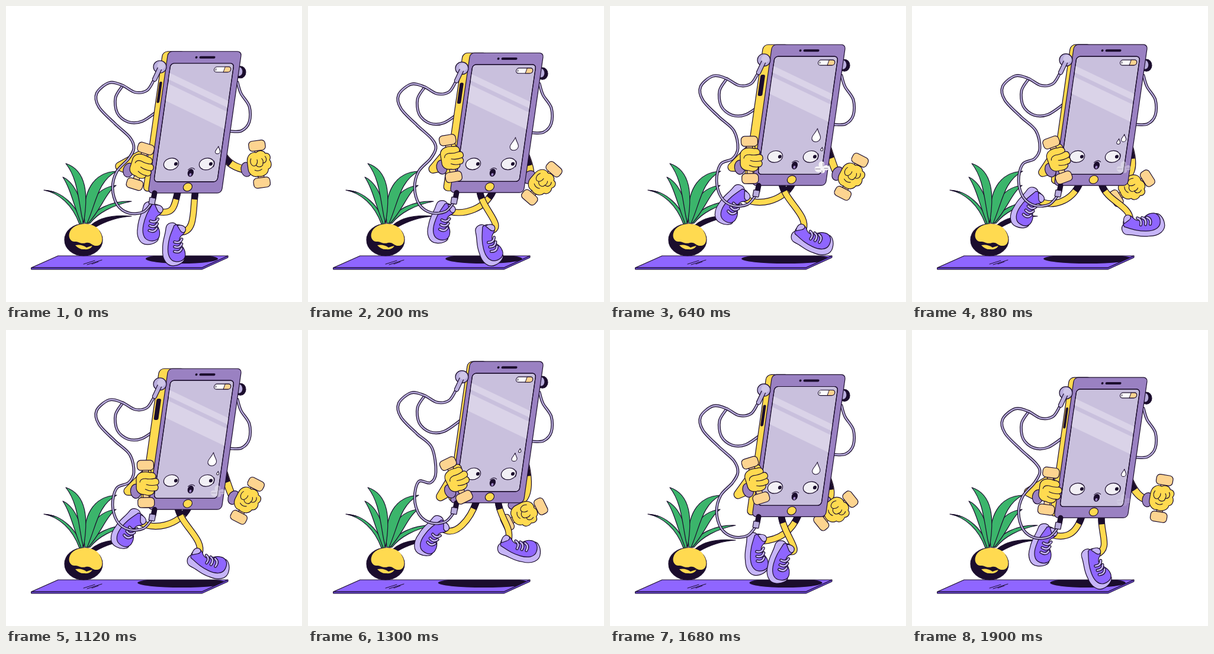
Animation, 500 px wide and 500 px high, one loop 1920 ms. Source, as an HTML page with a canvas:

```html
<!DOCTYPE html>
<html lang="en">
<head>
<meta charset="utf-8">
<title>Running phone</title>
<style>
html, body { margin: 0; width: 100%; height: 100%; overflow: hidden; background: #fff; }
canvas { display: block; width: 100vw; height: 100vh; }
</style>
</head>
<body>
<canvas id="stage" width="500" height="500"></canvas>
<script>
const g = document.getElementById('stage').getContext('2d');
const LOOP = 1920, STRIDE = 480;
const INK = '#1b0d2d', YELLOW = '#ffda50', PEACH = '#fdd490', PURPLE = '#9a81c2',
  VIOLET = '#8f66ff', LILAC = '#c6b5f7', CABLE = '#b9addd', GREEN = '#3bb56b', WHITE = '#fff';

// Key poses: time, then values
const BODY = [ // top, bottom, side width, shadow radius
  [0, 77, 316, 9, 61], [40, 64, 309, 12, 68], [100, 53, 294, 16, 77], [160, 65, 303, 15, 75],
  [205, 80, 316, 12, 64], [235, 77, 316, 10, 61], [275, 64, 309, 7, 68], [335, 53, 292, 4, 77],
  [400, 65, 303, 6, 75], [460, 80, 317, 8, 64]];
const LEFT_LEG = [ // foot x, y, angle, hip x
  [0, 245, 368, 98, 290], [40, 248, 391, 70, 308], [115, 385, 367, 0, 296], [160, 345, 393, 20, 290],
  [195, 315, 402, 65, 290], [220, 287, 405, 90, 290], [265, 290, 380, 110, 288],
  [365, 188, 343, 125, 284], [400, 195, 343, 120, 283], [460, 222, 365, 105, 287]];
const RIGHT_LEG = [
  [0, 287, 404, 90, 320], [40, 295, 380, 110, 317], [115, 192, 343, 126, 310], [160, 207, 338, 124, 308],
  [195, 222, 365, 105, 312], [220, 245, 368, 98, 316], [265, 260, 388, 70, 320],
  [360, 380, 364, 0, 321], [400, 392, 367, -5, 320], [460, 315, 402, 65, 320]];
const LEFT_HAND = [ // x, y, angle, elbow x, y
  [0, 227, 271, -17, 189, 271], [40, 224, 260, -25, 190, 258], [160, 236, 260, 1, 203, 272],
  [290, 250, 252, 24, 218, 280], [400, 246, 260, 20, 218, 281], [460, 231, 272, -7, 194, 274]];
const RIGHT_HAND = [ // x, y, angle
  [0, 428, 268, 7], [40, 427, 233, 24], [75, 427, 233, 20], [160, 408, 288, -27],
  [280, 372, 309, -58], [400, 371, 308, -58], [460, 421, 285, -10]];
const DROP_A = [ // height on the screen, size
  [40, 174, 1], [160, 177, .5], [200, 178, 0], [270, 147, 0], [400, 158, 1], [460, 162, 1]];
const DROP_B = [[10, 144, 0], [40, 145, .6], [160, 153, 1.8], [400, 164, .75], [450, 166, 0]];
const PUFF = [[0, 0], [250, 0], [400, .35], [640, 1], [880, .4], [1120, .45], [1300, 0], [1800, 0], [1900, .18]];

// Smooth periodic interpolation between key poses
function pose(keys, t, period = STRIDE) {
  const n = keys.length;
  const key = i => {
    const turn = Math.floor(i / n), [time, ...v] = keys[i - turn * n];
    return [time + turn * period, ...v];
  };
  let i = -1;
  while (key(i + 1)[0] <= t) i++;
  const [a, b, c, d] = [key(i - 1), key(i), key(i + 1), key(i + 2)];
  const h = c[0] - b[0], s = (t - b[0]) / h;
  return b.slice(1).map((p, j) => {
    j++;
    const m = (c[j] - a[j]) / (c[0] - a[0]) * h, k = (d[j] - b[j]) / (d[0] - b[0]) * h;
    return p + s * (m + s * (3 * (c[j] - p) - 2 * m - k + s * (m + k - 2 * (c[j] - p))));
  });
}

const rad = a => a * Math.PI / 180;
function turn(x, y, a) {
  const c = Math.cos(rad(a)), s = Math.sin(rad(a));
  return [x * c - y * s, x * s + y * c];
}
function at(x, y, a, draw) {
  g.save();
  g.translate(x, y);
  g.rotate(rad(a));
  draw();
  g.restore();
}
function paint(path, fill, line = 1.2) {
  if (fill) { g.fillStyle = fill; g.fill(path); }
  if (line) { g.strokeStyle = INK; g.lineWidth = line; g.stroke(path); }
}
const shape = (d, fill, line) => paint(new Path2D(d), fill, line);
function oval(x, y, rx, ry, fill, line) {
  const p = new Path2D();
  p.ellipse(x, y, rx, ry, 0, 0, 7);
  paint(p, fill, line);
}
function box(x, y, w, h, r, fill, line) {
  const p = new Path2D();
  p.roundRect(x, y, w, h, r);
  paint(p, fill, line);
}
function tube(path, width, color, cap = 'round') {
  g.lineCap = cap;
  g.strokeStyle = INK; g.lineWidth = width + 2.4; g.stroke(path);
  g.strokeStyle = color; g.lineWidth = width; g.stroke(path);
  g.lineCap = 'round';
}
function thread(points) {
  const p = new Path2D(), q = i => points[Math.max(0, Math.min(points.length - 1, i))];
  p.moveTo(...points[0]);
  for (let i = 0; i < points.length - 1; i++) {
    const [a, b, c, d] = [q(i - 1), q(i), q(i + 1), q(i + 2)];
    p.bezierCurveTo(b[0] + (c[0] - a[0]) / 6, b[1] + (c[1] - a[1]) / 6,
      c[0] - (d[0] - b[0]) / 6, c[1] - (d[1] - b[1]) / 6, ...c);
  }
  tube(p, 2.4, CABLE);
}

function mat(rx) {
  shape('M43 442L88 422H375L331 442Z', VIOLET);
  shape('M43 442H331L375 422V425L331 445H43Z', '#6545c9', 1);
  shape('M131 436L150 430M137 437L162 429M145 436L156 432', null, 1);
  g.save();
  g.clip(new Path2D('M43 442L88 422H375L331 442Z'));
  oval(297, 427, rx, 8, INK, 0);
  g.restore();
}

function plant() {
  shape('M140 374Q160 351 212 355Q180 357 150 374Z', INK);
  shape('M128 369C122 338 94 312 64 311C90 316 112 336 124 368Z', GREEN);
  shape('M130 369C132 335 118 299 96 289C109 309 114 335 127 368Z', GREEN);
  shape('M138 367C146 343 178 329 212 330C180 336 155 350 142 367Z', GREEN);
  shape('M136 367C139 327 158 306 186 303C169 315 160 344 139 367Z', GREEN);
  shape('M133 367C128 312 148 281 187 279C155 296 153 330 137 367Z', GREEN);
  shape('M131 367C139 320 137 278 101 266C119 289 121 316 128 355Z', GREEN);
  shape('M64 311Q77 311 85 316Q73 314 64 311Z', INK, 0);
  oval(131, 395, 32, 27, INK);
  shape('M107 384C112 364 151 362 159 382C165 393 163 404 154 405C145 406 144 398 135 400C126 403 122 397 117 398C110 399 105 392 107 384Z', YELLOW, 0);
  shape('M117 404Q128 402 136 408Q141 406 146 405Q142 412 133 411Q124 412 117 404Z', YELLOW, 0);
}

function shoe() {
  shape('M-34 -1C-40 4 -38 16 -28 17C-14 18 -8 23 8 22C24 23 37 15 35 2C34 -8 27 -16 22 -15L13 6Z', LILAC);
  shape('M-33 3C-37 -5 -31 -15 -23 -15C-16 -14 -18 -7 -9 -6C0 -6 3 -15 13 -16C24 -18 29 -10 28 0C27 10 16 14 3 13C-12 12 -20 8 -33 3Z', VIOLET);
  shape('M-33 -2C-35 -12 -30 -18 -24 -16C-19 -14 -21 -9 -25 -7Z', LILAC);
  g.lineJoin = 'round';
  for (const x of [-6, 2, 10]) {
    const p = new Path2D(`M${x - 4} -10Q${x + 4} -7 ${x + 1} 2`);
    tube(p, 2.6, LILAC);
  }
}

function leg(keys, t, bottom) {
  const [x, y, a, hip] = pose(keys, t);
  const [ax, ay] = turn(-22, -8, a), [kx, ky] = turn(0, -26, a);
  const p = new Path2D();
  p.moveTo(hip, bottom - 3);
  p.bezierCurveTo(hip + (x + ax - hip) * .2, bottom + 28, x + ax + kx, y + ay + ky, x + ax, y + ay);
  tube(p, 9, YELLOW);
  g.setLineDash([14, 999]);
  g.lineCap = 'butt';
  g.strokeStyle = INK;
  g.lineWidth = 11;
  g.stroke(p);
  g.setLineDash([]);
  g.lineCap = 'round';
  at(x, y, a, shoe);
}

function dumbbell() {
  box(-5, -26, 10, 52, 2, PEACH);
  box(-14, -40, 28, 17, 6, PEACH);
  box(-14, 23, 28, 17, 6, PEACH);
}

function rightArm(t, bottom) {
  const [x, y, a] = pose(RIGHT_HAND, t), [dx, dy] = turn(-24, 6, -a);
  const p = new Path2D();
  p.moveTo(368, bottom - 62);
  p.quadraticCurveTo(380, y + dy - 4, x + dx, y + dy);
  tube(p, 11, YELLOW);
  g.setLineDash([17, 999]);
  g.lineCap = 'butt';
  g.strokeStyle = INK;
  g.stroke(p);
  g.setLineDash([]);
  g.lineCap = 'round';
  at(x, y, -a, () => {
    oval(-23, 6, 9, 12, PURPLE);
    dumbbell();
    shape('M-20 -5C-20 -18 -10 -23 -3 -20C3 -25 11 -21 12 -17C20 -17 21 -9 18 -5C22 2 19 9 14 10C13 18 4 23 -5 20C-13 22 -20 14 -20 6Z', YELLOW);
    shape('M-13 -11C-17 -4 -12 5 -6 1C-2 7 6 5 6 -1C13 -1 14 -8 11 -12M-6 1Q-2 -3 -3 -8M6 -1Q8 -5 5 -9M-9 9Q-3 13 3 9', null, 1.1);
  });
}

function leftArm(t, bottom, cord) {
  const [x, y, a, ex, ey] = pose(LEFT_HAND, t), [dx, dy] = turn(-17, 12, -a);
  const p = new Path2D();
  p.moveTo(x + 2, y - 20);
  p.lineTo(ex + 3, ey);
  p.lineTo(x + dx, y + dy);
  g.lineJoin = 'round';
  tube(p, 13, YELLOW);
  cord();
  at(x, y, -a, () => {
    oval(-17, 12, 9, 12, PURPLE);
    dumbbell();
    shape('M-16 -10C-14 -20 -3 -22 8 -19C16 -20 19 -13 16 -9C23 -9 24 0 19 2C23 6 20 13 14 12C14 19 5 21 -2 18C-12 18 -17 12 -16 4Z', YELLOW);
    shape('M16 -9Q8 -7 -1 -9M19 2Q9 4 1 1M14 12Q6 13 -1 9M-1 -9Q-9 -9 -10 -3', null, 1.1);
  });
}

function drop(x, y, size) {
  if (size < .05) return;
  g.save();
  g.translate(x, y);
  g.scale(size, size);
  shape('M0 -6C1 -2 4 0 4 3A4 3.6 0 0 1 -4 3C-4 0 -1 -2 0 -6Z', WHITE, 1 / size);
  g.restore();
}

function phone(t, time, top, bottom, side) {
  const lean = -34 / 239;
  g.save();
  g.transform(1, 0, lean, (bottom - top) / 239, 274, top);
  box(-side, 0, side + 30, 236, 8, YELLOW);
  if (side > 6.5) box(-side * .82, 51, side * .52, 36, 3, INK, 0);
  box(0, 0, 124, 239, 7, PURPLE);
  oval(49, 10, 2, 2, INK, 0);
  box(54, 8, 27, 4, 2, INK, 0);
  box(7, 20, 107, 200, 6, '#c9c0dd');
  g.save();
  g.clip(new Path2D('M7 22H114V218H7Z'));
  shape('M7 36L114 84V95L7 47ZM7 54L114 102V131L7 83Z', '#dad3e8', 0);
  g.restore();
  box(7, 20, 107, 200, 6, null);
  box(82, 26, 28, 9, 4.5, WHITE);
  shape('M100 26H105.5A4.5 4.5 0 0 1 105.5 35H98Z', PEACH, 1);
  shape('M85 29V32', null, 1);
  for (const [x, pupil] of [[32, 40], [92, 99]]) {
    oval(x, 190, 12.5, 10, '#f2f0f5');
    oval(pupil, 190, 3, 3, INK, 0);
  }
  shape('M104 185Q106 190 104 195', null, 1);
  oval(67, 205, 4.5, 6, INK);
  oval(67, 208, 2, 2.5, PURPLE, 0);
  shape('M62 200Q67 194 73 199', null, 1);
  oval(65.5, 229, 7.5, 7, YELLOW);
  const [ya, sa] = pose(DROP_A, t), [yb, sb] = pose(DROP_B, t);
  drop(84 - ya * lean, ya, sa);
  drop(75 - yb * lean, yb, sb);
  g.restore();

  const [mist] = pose(PUFF, time, LOOP);
  if (mist > .02) {
    g.save();
    g.globalAlpha = Math.min(1, mist);
    g.translate(357, top + 207);
    shape('M-11 3C-12 -1 -7 -2 -4 -1C-6 -8 -1 -12 3 -9C6 -8 5 -4 4 -2C9 -5 13 -2 13 1C13 5 9 6 6 5C7 10 1 12 -2 8C-6 10 -11 7 -11 3Z', '#f6f4f8', 0);
    shape('M-10 3H-2M3 -7V-2M5 2H11M1 6V9', null, .5);
    g.restore();
  }
}

function earphones(top, bottom) {
  thread([[249, top + 50], [238, top + 66], [218, top + 69], [196, top + 57], [174, top + 53],
    [153, top + 71], [157, top + 94], [184, top + 122], [209, top + 145], [216, 240], [207, 258],
    [187, bottom - 36], [180, bottom - 8], [188, bottom + 20], [208, bottom + 34], [232, bottom + 32], [246, bottom + 17]]);
  shape(`M251 ${bottom}L249 ${bottom + 10}`, null, 9);
  at(247, bottom + 13, 10, () => box(-5, -5, 10, 11, 1, CABLE));
}

function bud(top) {
  const p = new Path2D(`M259 ${top + 30}L251 ${top + 47}`);
  oval(260, top + 26, 11, 10.5, CABLE);
  tube(p, 6, CABLE);
  oval(262, top + 24, 6.5, 6.5, '#cfc6e8', 0);
}

function draw(time) {
  const t = time % STRIDE, [top, bottom, side, rx] = pose(BODY, t);
  g.clearRect(0, 0, 500, 500);
  g.lineCap = 'round';
  mat(rx);
  plant();
  thread([[391, top + 52], [397, top + 71], [411, top + 93], [411, top + 119], [398, top + 134], [379, top + 135]]);
  oval(396, top + 35, 9, 10, INK);
  oval(394, top + 34, 6, 8, CABLE);
  rightArm(t, bottom);
  thread([[197, top + 58], [185, top + 78], [188, top + 104], [206, top + 119], [230, top + 118], [258, top + 99]]);
  leg(RIGHT_LEG, t, bottom);
  leg(LEFT_LEG, t, bottom);
  phone(t, time, top, bottom, side);
  leftArm(t, bottom, () => earphones(top, bottom));
  bud(top);
}

const start = performance.now();
function frame() {
  draw((performance.now() - start) % LOOP);
  requestAnimationFrame(frame);
}
frame();
</script>
</body>
</html>
```
